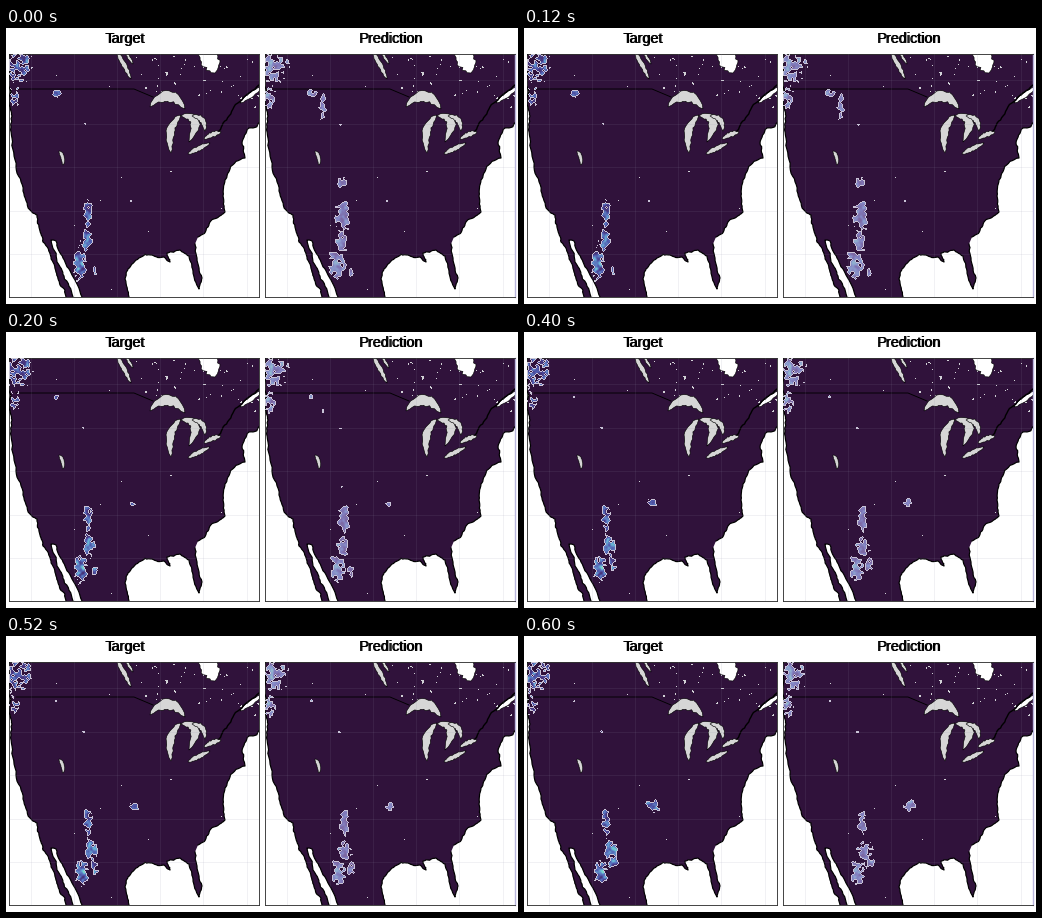
Recreate the animation shown at these times as a matplotlib script. Size 512x276 px, loop 800 ms.

```python
import numpy as np
import matplotlib.pyplot as plt
from matplotlib.animation import FuncAnimation
from matplotlib.colors import LinearSegmentedColormap
from matplotlib.patches import Polygon

W, H, DPI = 512, 276, 100
PX = 72 / DPI
LEFT, TOP, RIGHT, BOTTOM = 3, 26, 253, 269
EXTENT = (LEFT, RIGHT, BOTTOM, TOP)
FRAMES, INTERVAL = 4, 200
LAND, LAKE = "#30123b", "#d6d6d6"
RAIN = LinearSegmentedColormap.from_list(
    "rain", ["#3b2a72", "#4450a6", "#557fc4", "#5fb8d6", "#72dccb"])
MAUVE = np.array([0.70, 0.62, 0.80])

# Key points of each shore; the ragged detail comes from rough().
PACIFIC = [(3, 26), (3, 76), (6, 88), (6, 110), (10, 139), (17, 163), (24, 182), (31, 187),
           (34, 203), (37, 214), (45, 229), (50, 244), (54, 257), (60, 269)]
CORTEZ = [(67, 269), (58, 248), (51, 234), (45, 212), (50, 213), (57, 230), (66, 247), (76, 269)]
GULF = [(123, 269), (119, 251), (122, 241), (133, 230), (146, 227), (158, 229), (164, 234),
        (161, 225), (174, 222), (183, 228), (187, 243), (193, 261), (196, 250), (191, 230),
        (189, 216)]
ATLANTIC = [(192, 209), (202, 199), (211, 190), (219, 184), (217, 168), (219, 152), (224, 141),
            (239, 130), (236, 115), (243, 100), (255, 92), (255, 26)]
# Start, bend, end and half width of each water body.
LAKES = [
    ((144, 79), (161, 56), (179, 81), 5.5), ((165, 125), (160, 99), (175, 87), 4.2),
    ((175, 88), (198, 86), (183, 114), 5), ((186, 88), (199, 88), (199, 103), 3),
    ((182, 126), (191, 121), (204, 115), 2.6), ((198, 111), (206, 106), (215, 104), 2.8),
    ((110, 22), (118, 36), (125, 51), 2.6), ((119, 22), (123, 30), (127, 36), 1.6),
    ((53, 123), (58, 128), (57, 137), 2.2),
]
SEAS = [((198, 12), (203, 32), (209, 45), 9), ((258, 58), (244, 67), (234, 75), 2.4)]


def rough(points, seed, levels=3, amount=0.07):
    """Make a ragged shore by repeated midpoint displacement."""
    rng = np.random.default_rng(seed)
    path = np.array(points, float)
    for _ in range(levels):
        step = np.diff(path, axis=0)
        normal = np.column_stack([-step[:, 1], step[:, 0]])
        middle = path[:-1] + step / 2 + normal * rng.normal(0, amount, (len(step), 1))
        path = np.insert(path, range(1, len(path)), middle, axis=0)
    return path


def lake_shape(start, bend, end, width, seed):
    """A tapered body of water around a quadratic curve."""
    s = np.linspace(0, 1, 16)[:, None]
    a, b, c = map(np.array, (start, bend, end))
    spine = (1 - s) ** 2 * a + 2 * s * (1 - s) * b + s ** 2 * c
    along = np.gradient(spine, axis=0)
    normal = np.column_stack([-along[:, 1], along[:, 0]])
    normal /= np.hypot(*normal.T)[:, None]
    half = width * np.sin(np.pi * s) ** 0.6
    rng = np.random.default_rng(seed)
    left, right = (spine + k * half * normal * rng.uniform(0.7, 1.15, s.shape) for k in (1, -1))
    return np.vstack([left, right[::-1]])


def smooth(field, passes):
    for _ in range(passes):
        for axis in (0, 1):
            field = np.roll(field, 1, axis) + 2 * field + np.roll(field, -1, axis)
    return (field - field.mean()) / field.std()


yy, xx = np.mgrid[TOP:BOTTOM, LEFT:RIGHT] + 0.5


def storms(t, forecast):
    """Cells (x, y, half width, half height) at loop position t, 0 to 1."""
    fade = (1 - t) ** 2
    return [
        (13, 39, 12, 16), (8, 68, 5, 12), (78, 96, 2, 1.5),
        (50, 65, 1 + 4 * fade, 1 + 3 * fade),
        (82 - forecast * fade, 186, 4 + 3.5 * forecast * fade, 16 - 2 * t),
        (80 + (7 - 2 * forecast) * t, 213 + 2 * t, 6 + t, 12 - 2 * t),
        (74 + 3 * t, 237, 6.5 + 2 * forecast * fade, 15 - 3 * t),
        (89, 244 - 17 * t, 2 + 3 * t, 6),
        (125 + 4 * t, 173 - 3 * t, 1 + 6 * t, 1 + 4.5 * t),
        (80, 155, 4 * forecast * fade ** 2, 6 * forecast * fade ** 2),
        (61, 79, 4 * forecast * fade ** 2, 12 * forecast * fade ** 2),
    ]


def rain(t, forecast):
    """RGBA layer of ragged cells with pale outlines."""
    rng = np.random.default_rng(31 + forecast)
    grain = smooth(rng.normal(size=xx.shape), 2)
    tone = smooth(rng.normal(size=xx.shape), 3)
    grain = np.roll(grain, round(3 * t), 1)
    shape = np.full(xx.shape, -9.0)
    for x, y, rx, ry in storms(t, forecast):
        d = ((xx - x) / (rx + 0.1)) ** 2 + ((yy - y) / (ry + 0.1)) ** 2
        shape = np.maximum(shape, 1 - d)
    scattered = 0.2 * ((xx < 30) & (yy < 85))
    level = shape + (0.42 + scattered) * grain - 0.22 - scattered
    mask = (level > 0) & (shape > -0.5)
    inside = mask.copy()
    for axis in (0, 1):
        for s in (-1, 1):
            inside &= np.roll(mask, s, axis)
    core = 0.3 * np.exp(-((xx - 76) / 9) ** 2 - ((yy - 234) / 12) ** 2)
    rgba = RAIN(np.clip(0.1 + 0.28 * level + 0.18 * tone + core, 0, 1))
    rgba[..., :3] += (0.1 + 0.45 * forecast) * (MAUVE - rgba[..., :3])
    rgba[mask & ~inside] = (0.86, 0.85, 0.92, 0.9)
    rgba[~mask] = 0
    return rgba


def ponds():
    """Small lakes, densest in the north-east."""
    field = smooth(np.random.default_rng(7).normal(size=xx.shape), 1)
    north_east = (xx > 125) & (yy < 45 + 0.2 * (xx - 125) + 15)
    rgba = np.zeros(xx.shape + (4,))
    rgba[field > np.where(north_east, 2.25, 3.35)] = (0.82, 0.82, 0.84, 1)
    return rgba


def draw_map(ax):
    shores = [rough(p, i) for i, p in enumerate((PACIFIC, CORTEZ, GULF, ATLANTIC))]
    land = ax.add_patch(Polygon(np.vstack(shores), fc=LAND, ec="none", zorder=1))
    ax.imshow(ponds(), extent=EXTENT, aspect="auto", interpolation="nearest",
              zorder=2).set_clip_path(land)
    for shore in shores:
        ax.plot(*shore.T, color="black", lw=1.2 * PX, zorder=3)
    for color, bodies in ((LAKE, LAKES), ("white", SEAS)):
        for i, body in enumerate(bodies):
            ax.add_patch(Polygon(lake_shape(*body, i), fc=color, ec="black", lw=0.6 * PX, zorder=2))
    river = rough([(213, 103), (223, 88), (236, 72), (253, 57)], 5)
    ax.plot(*river.T, color="black", lw=1.4 * PX, zorder=3)
    ax.plot([10, 128, 147], [61, 61, 69], color="black", lw=0.9 * PX, zorder=3)
    grid = dict(color="#8f8fa8", alpha=0.15, lw=0.8 * PX, zorder=4)
    for y in np.arange(52.5, BOTTOM, 43.5):
        ax.axhline(y, **grid)
    for x in np.arange(24.5, RIGHT, 43.2):
        ax.axvline(x, **grid)


fig = plt.figure(figsize=(W / DPI, H / DPI), dpi=DPI, facecolor="white")
layers, films = [], []
panels = (("Target", 119, 0), ("Prediction", 385.5, 256))
for forecast, (title, center, shift) in enumerate(panels):
    ax = fig.add_axes([(LEFT + shift) / W, 1 - BOTTOM / H, (RIGHT - LEFT) / W, (BOTTOM - TOP) / H])
    draw_map(ax)
    films.append([rain(i / (FRAMES - 1), forecast) for i in range(FRAMES)])
    layers.append(ax.imshow(films[-1][0], extent=EXTENT, aspect="auto",
                            interpolation="nearest", zorder=5))
    ax.set(xlim=(LEFT, RIGHT), ylim=(BOTTOM, TOP), xticks=[], yticks=[])
    for spine in ax.spines.values():
        spine.set(color="#333333", linewidth=0.9 * PX)
    for dx in (-0.5, 0.5):
        fig.text((center + dx) / W, 1 - 15 / H, title, ha="center", va="baseline",
                 family="Liberation Sans", size=14.3 * PX, color="black")
ax.spines["right"].set(color="#b9b6dc", linewidth=1.4 * PX)


def update(frame):
    for layer, film in zip(layers, films):
        layer.set_data(film[frame])
    return layers


animation = FuncAnimation(fig, update, frames=FRAMES, interval=INTERVAL, repeat=True,
                          repeat_delay=0)
plt.show()
```
